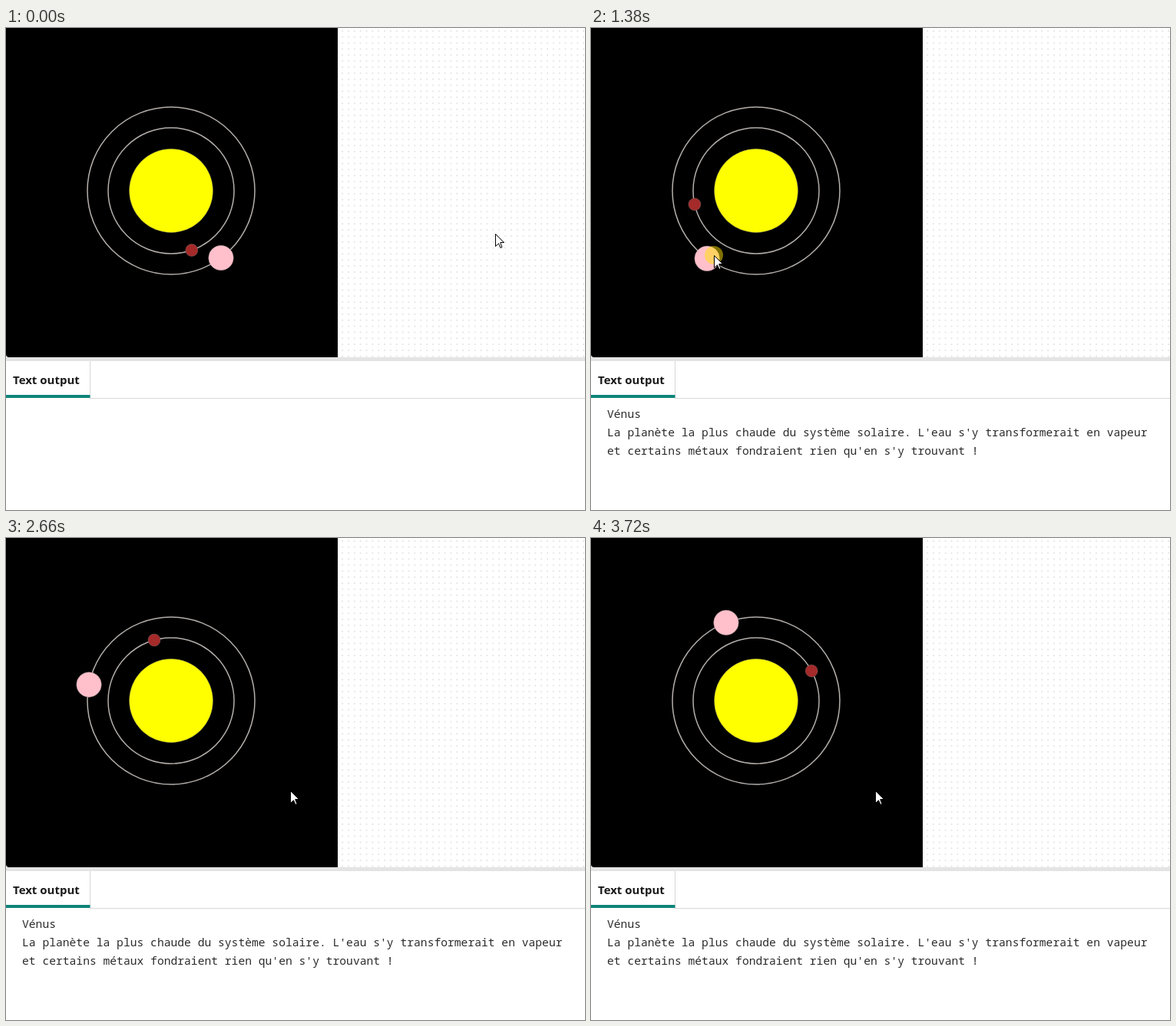
Animation of 754x628 px, one loop 3790 ms. Source, as an HTML page:

```html
<!DOCTYPE html>
<html lang="fr">
<head>
<meta charset="utf-8">
<title>Orbites</title>
<style>
  html, body { margin: 0; width: 100%; height: 100%; overflow: hidden; background: #fff; }
  svg { display: block; width: 754px; height: 628px; }
  .tab { font: 700 15px "Noto Sans", sans-serif; fill: #1a1a1a; }
  .out { font: 14.66px "Noto Sans Mono", monospace; fill: #2b2b2b; white-space: pre; }
  .body { stroke: #777; stroke-opacity: 0.5; stroke-width: 0.8; }
</style>
</head>
<body>
<svg viewBox="0 0 754 628">
  <defs>
    <pattern id="dots" x="520.5" y="0" width="7.85" height="7.85" patternUnits="userSpaceOnUse">
      <circle cx="4" cy="4" r="0.95" fill="#dedede"/>
    </pattern>
  </defs>
  <rect width="754" height="628" fill="#fff"/>
  <rect x="432" width="322" height="429" fill="url(#dots)"/>
  <rect y="429" width="754" height="5" fill="#e4e4e4"/>
  <path d="M0 0H432V429H4Q0 429 0 425Z"/>

  <g fill="none" stroke="#b3aeaa" stroke-width="1.5">
    <circle cx="215" cy="212" r="82"/>
    <circle cx="215" cy="212" r="109"/>
  </g>
  <circle class="body" cx="215" cy="212" r="54.5" fill="#ff0"/>
  <circle class="body" id="inner" r="8" fill="#a52a2a"/>
  <circle class="body" id="outer" r="16.3" fill="#ffc0cb"/>

  <path d="M109.5 434V482M109 482.5H754" fill="none" stroke="#d8d8d8"/>
  <rect y="478" width="109.5" height="4" fill="#0f8479"/>
  <text class="tab" x="9" y="464">Text output</text>
  <g id="out" class="out">
    <text x="21" y="508">Vénus</text>
    <text x="21" y="532">La planète la plus chaude du système solaire. L'eau s'y transformerait en vapeur</text>
    <text x="21" y="556">et certains métaux fondraient rien qu'en s'y trouvant !</text>
  </g>

  <g id="pointer">
    <circle id="press" r="12" fill="#ffe100" fill-opacity="0.5"/>
    <path d="M.5 .5V16.5L4.5 12.8L7 18.4L9 17.5L6.8 12V11.5H11.5Z" fill="#fff" stroke="#000" stroke-linejoin="round"/>
  </g>
</svg>
<script>
const LOOP = 3790, STEPS = 55, LEAD = 27;
const $ = id => document.getElementById(id);

// Pointer moves: steps from..to, end point, and how far the path sags.
const HOME = [637, 268];
const MOVES = [
  { from: 0, to: 8, end: [234, 333], sag: 30 },
  { from: 8, to: 20, end: [160, 296], sag: 0 },
  { from: 22.3, to: 36, end: [370, 329], sag: 5 },
];

const ease = u => u * u * u * (10 + u * (6 * u - 15));

function pointerAt(step) {
  let [x, y] = HOME;
  for (const { from, to, end, sag } of MOVES) {
    const u = Math.min(1, Math.max(0, (step - from) / (to - from)));
    const e = ease(u);
    x += (end[0] - x) * e;
    y += (end[1] - y) * e + sag * Math.sin(Math.PI * e);
  }
  return [Math.round(x), Math.round(y)];
}

function place(id, radius, degrees) {
  const a = degrees * Math.PI / 180;
  $(id).setAttribute("cx", 215 + radius * Math.cos(a));
  $(id).setAttribute("cy", 212 + radius * Math.sin(a));
}

function show(id, on) {
  $(id).setAttribute("visibility", on ? "visible" : "hidden");
}

function draw(ms) {
  const step = Math.min(STEPS - 1, Math.floor((ms % LOOP + LEAD) * STEPS / LOOP));
  const turn = 4.83 * step;
  place("inner", 82, 70.9 + turn);
  place("outer", 109, 53.4 + turn * 0.75);
  $("pointer").setAttribute("transform", `translate(${pointerAt(step)})`);
  show("press", step >= 19 && step <= 21);
  show("out", step >= 20);
}

let begin;
function tick(now) {
  begin ??= now;
  draw(now - begin);
  requestAnimationFrame(tick);
}
draw(0);
requestAnimationFrame(tick);
</script>
</body>
</html>
```
